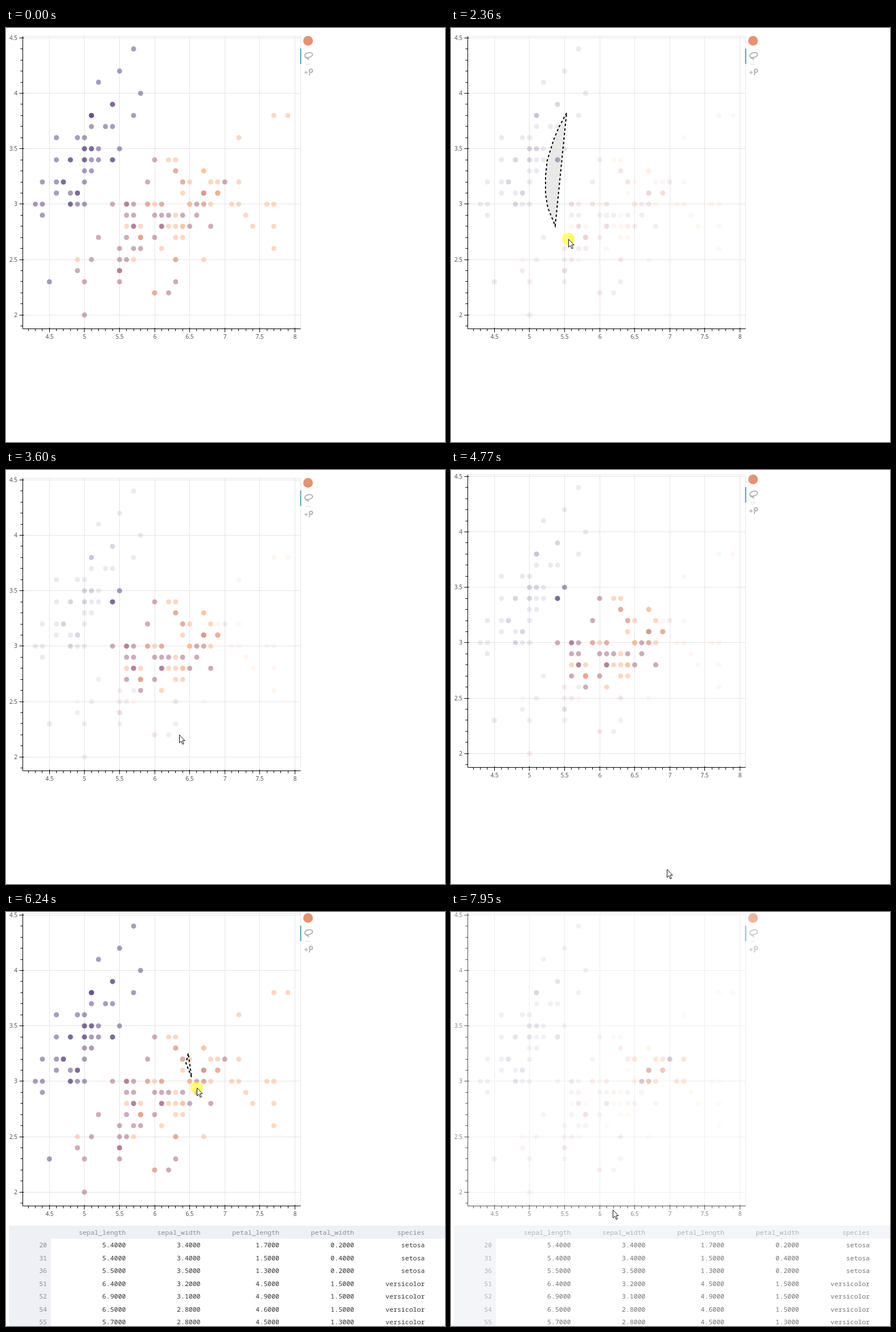
Animation, 771 px wide and 726 px high, one loop 8 s. Source, as an HTML page with a canvas:

```html
<!DOCTYPE html>
<html lang="en">
<head>
<meta charset="utf-8">
<title>Lasso selection</title>
<style>
  html, body { margin: 0; width: 100%; height: 100%; overflow: hidden; background: #fff; }
  canvas { display: block; }
</style>
</head>
<body>
<canvas id="stage" width="771" height="726"></canvas>
<script>
const LOOP = 8000;
const ctx = document.getElementById('stage').getContext('2d');

// Sepal width in tenths -> sepal lengths in tenths, one group per species.
const groups = [
  { color: '#513b75', rows: {
    44: [57], 42: [55], 41: [52], 40: [58], 39: [54, 54], 38: [51, 51, 51, 57],
    37: [51, 53, 54], 36: [46, 49, 50], 35: [50, 50, 51, 51, 52, 55],
    34: [46, 48, 48, 50, 50, 51, 52, 54, 54], 33: [50, 51], 32: [44, 46, 47, 47, 50],
    31: [46, 48, 49, 49], 30: [43, 44, 48, 48, 49, 50], 29: [44], 23: [45] } },
  { color: '#9b5977', rows: {
    34: [60], 33: [63], 32: [59, 64, 70], 31: [67, 67, 69],
    30: [54, 56, 56, 57, 59, 61, 66, 67], 29: [56, 57, 60, 61, 62, 64, 66],
    28: [57, 57, 61, 61, 65, 68], 27: [52, 56, 58, 58, 60], 26: [55, 57, 58],
    25: [51, 55, 56, 63], 24: [49, 55, 55], 23: [50, 55, 63], 22: [60, 62], 20: [50] } },
  { color: '#fbb187', rows: {
    38: [77, 79], 36: [72], 34: [62, 63], 33: [63, 67, 67], 32: [64, 65, 68, 69, 72],
    31: [64, 67, 69, 69], 30: [59, 60, 61, 65, 65, 65, 67, 68, 71, 72, 76, 77],
    29: [63, 73], 28: [56, 58, 62, 63, 64, 64, 74, 77], 27: [58, 58, 63, 64],
    26: [61, 77], 25: [49, 57, 63, 67], 22: [60] } }
];

const plot = { left: 29.5, right: 517.5, top: 14.5, bottom: 527.5 };
const px = v => 76.2 + (v - 45) * 12.32;
const py = v => 503.3 - (v - 20) * 19.44;

const dots = groups.flatMap(({ color, rows }) =>
  Object.entries(rows).flatMap(([w, lengths]) =>
    lengths.map(l => ({ x: px(l), y: py(+w), color }))));

// Pointer moves: start, end and the evenly spaced stops between them.
const moves = [
  [430, 590, [[568, 698], [505, 410], [460, 246]]],
  [1600, 2360, [[400, 205], [300, 165], [203, 149], [190, 173], [181, 194], [169, 232],
    [166, 260], [166, 290], [170, 315], [183, 347], [206, 370]]],
  [2440, 3230, [[236, 395], [273, 402], [320, 397], [365, 384], [398, 365], [396, 340],
    [378, 290], [362, 255], [300, 213], [250, 185], [304, 464]]],
  [3600, 4380, [[304, 464], [306, 472], [310, 486], [316, 506], [325, 535], [335, 569],
    [346, 605], [358, 640], [368, 670], [376, 692], [379, 700]]],
  [5400, 5630, [[364, 610], [334, 460], [306, 350], [293, 306]]],
  [5860, 6630, [[335, 291], [320, 248], [316, 265], [326, 290], [335, 308], [375, 312],
    [412, 306], [424, 285], [418, 262], [412, 250], [410, 240]]],
  [6710, 6950, [[466, 330], [430, 430], [350, 500], [284, 522]]]
];
const stops = moves.flatMap(([from, to, path]) =>
  path.map(([x, y], i) => ({ t: from + (to - from) * i / (path.length - 1), x, y })));

// Each drag keeps its outline in plot coordinates.
const drags = [{ from: 1752, to: 3151, shift: 0 }, { from: 5937, to: 6553, shift: 12 }];
for (const d of drags) {
  d.path = stops.filter(s => s.t > d.from - 1 && s.t < d.to + 1)
    .map(s => ({ t: s.t, x: s.x, y: s.y + d.shift }));
  d.release = stops.find(s => s.t > d.to + 1).t;
}

const header = ['', 'sepal_length', 'sepal_width', 'petal_length', 'petal_width', 'species'];
const records = [
  [20, 5.4, 3.4, 1.7, 0.2, 'setosa'],
  [31, 5.4, 3.4, 1.5, 0.4, 'setosa'],
  [36, 5.5, 3.5, 1.3, 0.2, 'setosa'],
  [51, 6.4, 3.2, 4.5, 1.5, 'versicolor'],
  [52, 6.9, 3.1, 4.9, 1.5, 'versicolor'],
  [54, 6.5, 2.8, 4.6, 1.5, 'versicolor'],
  [55, 5.7, 2.8, 4.5, 1.3, 'versicolor']
];
const columns = [72, 210.5, 341.5, 480, 611.5, 735.5];

function inside(poly, p) {
  let hit = false;
  poly.forEach((a, i) => {
    const b = poly[(i + 1) % poly.length];
    if ((a.y > p.y) !== (b.y > p.y) && p.x < a.x + (b.x - a.x) * (p.y - a.y) / (b.y - a.y)) hit = !hit;
  });
  return hit;
}

function line(x1, y1, x2, y2) {
  ctx.beginPath();
  ctx.moveTo(x1, y1);
  ctx.lineTo(x2, y2);
  ctx.stroke();
}

function disc(x, y, r, color) {
  ctx.fillStyle = color;
  ctx.beginPath();
  ctx.arc(x, y, r, 0, 7);
  ctx.fill();
}

function pen(color, width) {
  ctx.strokeStyle = color;
  ctx.lineWidth = width;
}

const crisp = v => Math.floor(v) + 0.5;

function drawGrid() {
  const { left, right, top, bottom } = plot;
  pen('#e5e5e5', 1);
  for (let v = 45; v <= 80; v += 5) line(crisp(px(v)), top, crisp(px(v)), bottom);
  for (let v = 20; v <= 45; v += 5) line(left, crisp(py(v)), right, crisp(py(v)));
  ctx.strokeRect(left, top, right - left, bottom - top);
}

function drawAxes() {
  const { left, right, top, bottom } = plot;
  pen('#000', 1);
  line(left, top, left, bottom);
  line(left, bottom, right, bottom);
  ctx.font = '10px "Open Sans", "Noto Sans", sans-serif';
  ctx.fillStyle = '#444';
  ctx.textBaseline = 'alphabetic';
  ctx.textAlign = 'center';
  for (let v = 42; v <= 80; v++) {
    const x = crisp(px(v)), major = v % 5 === 0;
    line(x, major ? bottom - 2 : bottom, x, bottom + (major ? 6 : 4));
    if (major) ctx.fillText(v / 10, x, 545);
  }
  ctx.textAlign = 'right';
  for (let v = 19; v <= 45; v++) {
    const y = crisp(py(v)), major = v % 5 === 0;
    line(left - (major ? 6 : 4), y, major ? left + 2 : left, y);
    if (major) ctx.fillText(v / 10, 20, y + 3.3);
  }
}

function drawDots(picked) {
  const paint = (list, alpha) => {
    ctx.globalAlpha = alpha;
    for (const d of list) disc(d.x, d.y, 4.5, d.color);
  };
  const any = picked.size > 0;
  paint(dots.filter(d => any && !picked.has(d)), 0.11);
  paint(dots.filter(d => !any || picked.has(d)), 0.5);
  ctx.globalAlpha = 1;
}

function drawTools() {
  disc(530.5, 22.5, 8.5, '#e8926f');
  ctx.fillStyle = '#4fa0ba';
  ctx.fillRect(516.5, 36, 2, 27);
  ctx.fillStyle = '#ddd';
  ctx.fillRect(526, 63, 9, 1);
  pen('#b5b3b8', 2);
  ctx.beginPath();
  ctx.ellipse(531.5, 47.5, 7, 4.2, -0.25, 0, 7);
  ctx.stroke();
  ctx.beginPath();
  ctx.moveTo(526, 50);
  ctx.quadraticCurveTo(526, 53, 530, 53.5);
  ctx.lineTo(532, 56);
  ctx.stroke();
  ctx.beginPath();
  ctx.arc(535.5, 75, 2.8, 0, 7);
  ctx.stroke();
  line(534, 77.5, 532.5, 83);
  pen('#b5b3b8', 1.4);
  line(524, 78, 530, 78);
  line(527, 75, 527, 81);
}

function drawLasso(poly) {
  ctx.beginPath();
  poly.forEach(p => ctx.lineTo(p.x, p.y));
  ctx.closePath();
  ctx.fillStyle = 'rgba(211,211,211,.5)';
  ctx.fill();
  pen('#000', 2);
  ctx.setLineDash([4, 4]);
  ctx.stroke();
  ctx.setLineDash([]);
}

function drawTable() {
  ctx.fillStyle = '#eff0f5';
  ctx.fillRect(5, 550, 766, 23);
  ctx.fillRect(5, 550, 74, 176);
  ctx.font = '11.5px "Noto Sans Mono", "Liberation Mono", monospace';
  ctx.textAlign = 'right';
  ctx.textBaseline = 'alphabetic';
  [header, ...records].forEach((row, r) => row.forEach((cell, c) => {
    ctx.fillStyle = r && c ? '#333' : '#8a8d99';
    const text = c && typeof cell === 'number' ? cell.toFixed(4) : cell;
    ctx.fillText(text, columns[c], 566 + r * 22.45);
  }));
}

function drawPointer({ x, y }, pressed) {
  if (pressed) disc(x, y, 11, 'rgba(255,255,0,.55)');
  ctx.save();
  ctx.translate(x + 0.5, y + 0.5);
  ctx.beginPath();
  for (const [a, b] of [[0, 0], [0, 14], [3.2, 11], [5.6, 16.6], [7.8, 15.6], [5.4, 10.2], [9.6, 10]]) ctx.lineTo(a, b);
  ctx.closePath();
  ctx.fillStyle = '#fff';
  ctx.fill();
  pen('#111', 1);
  ctx.stroke();
  ctx.restore();
}

function draw(t) {
  const at = t + 0.01;
  const stop = stops.filter(s => s.t <= at).pop();
  const drag = drags.filter(d => d.from <= at).pop();
  const pressed = drag && at < drag.release;
  // The outline trails the pointer by one stop while the button is down.
  const poly = drag ? drag.path.filter(p => !pressed || p.t < stop.t) : [];
  const picked = new Set(dots.filter(d => inside(poly, d)));
  const scroll = t < 4770 ? 0 : t < 4850 ? 6 : 12;

  ctx.fillStyle = '#fff';
  ctx.fillRect(0, 0, 771, 726);
  ctx.save();
  ctx.translate(0, -scroll);
  drawGrid();
  drawDots(picked);
  drawAxes();
  drawTools();
  if (pressed && poly.length > 1) drawLasso(poly);
  ctx.restore();
  if (scroll === 12) drawTable();

  if (at >= 7410) {
    const step = Math.min(8, 1 + Math.floor((at - 7410) * 7 / 540));
    ctx.fillStyle = `rgba(255,255,255,${step * 0.04})`;
    ctx.fillRect(0, 0, 771, 726);
  }
  if (stop) drawPointer(stop, pressed);
}

const start = performance.now();
function tick() {
  draw((performance.now() - start) % LOOP);
  requestAnimationFrame(tick);
}
tick();
</script>
</body>
</html>
```
